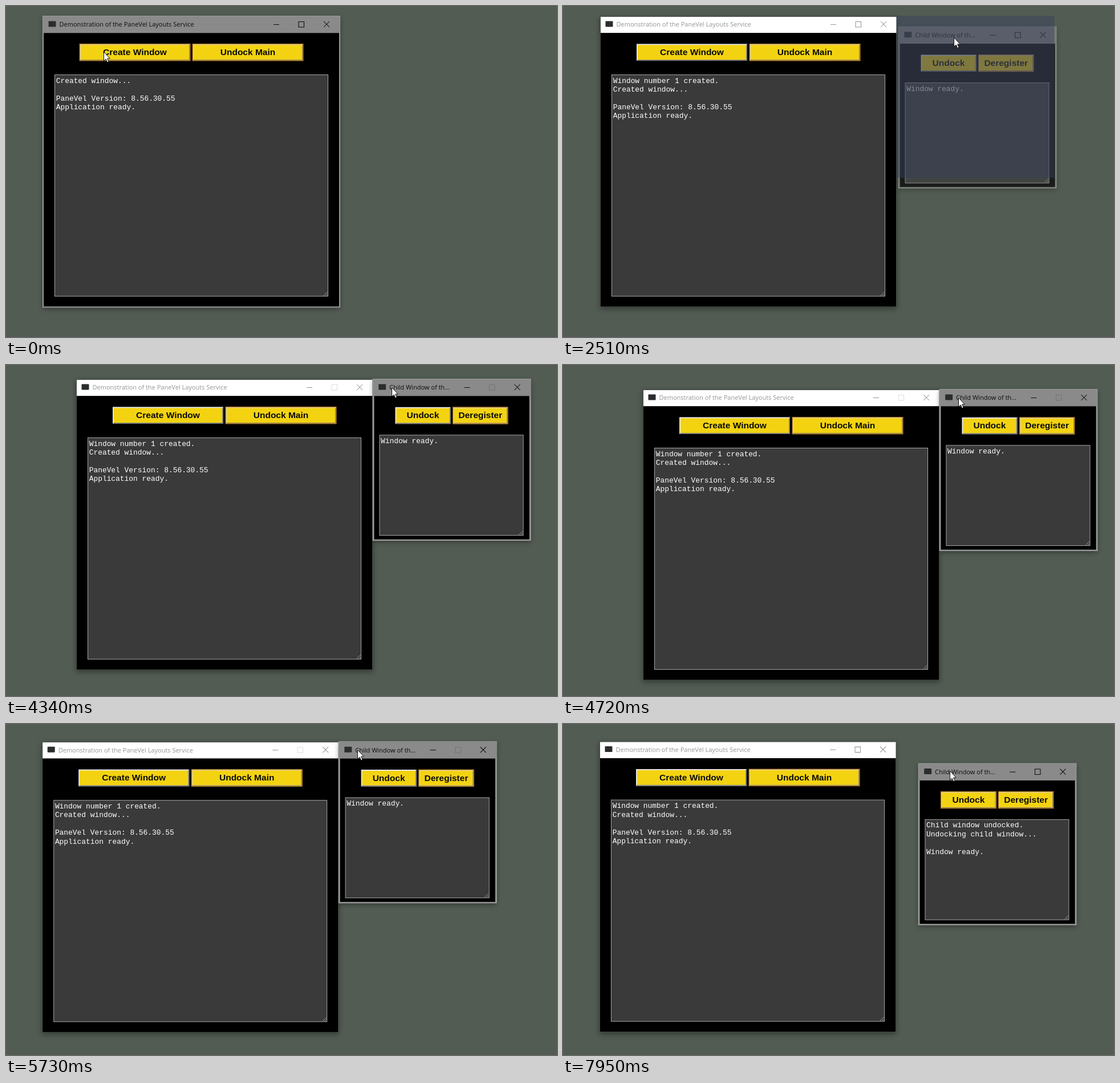
Animation of 966 by 580 pixels, one loop 8000 ms. Source, as an HTML page:

```html
<!DOCTYPE html>
<html lang="en">
<head>
<meta charset="utf-8">
<title>Window docking</title>
<style>
html, body { margin: 0; width: 100%; height: 100%; overflow: hidden; background: #525c53; }
svg { display: block; width: 966px; height: 580px; }
text { white-space: pre; }
.title { font: 11px "Open Sans", sans-serif; }
.label { font: bold 15.5px "Liberation Sans", Arial, sans-serif; text-anchor: middle; }
.log { font: 12.9px "Liberation Mono", "Courier New", monospace; fill: #fff; }
</style>
</head>
<body>
<svg id="stage" viewBox="0 0 966 580">
  <defs>
    <filter id="soft" x="-20%" y="-20%" width="140%" height="140%"><feGaussianBlur stdDeviation="5"/></filter>
  </defs>
  <rect width="966" height="580" fill="#525c53"/>
</svg>
<script>
const LOOP = 8000, LINE = 15.47;
const stage = document.getElementById('stage');

function add(parent, tag, attrs, text) {
  const node = document.createElementNS('http://www.w3.org/2000/svg', tag);
  for (const key in attrs) node.setAttribute(key, attrs[key]);
  if (text) node.textContent = text;
  parent.appendChild(node);
  return node;
}

function box(parent, l, t, r, b, fill, more) {
  return add(parent, 'rect', { x: l, y: t, width: r - l, height: b - t, fill, ...more });
}

const show = (node, on) => node.setAttribute('display', on ? 'inline' : 'none');
const move = (node, [x, y]) => node.setAttribute('transform', `translate(${x} ${y})`);

// Raised button with an optional focus ring
function button(parent, l, t, r, b, label) {
  box(parent, l, t, r, b, '#e6e6e6');
  add(parent, 'path', { d: `M${l} ${b}l2-2H${r - 2}V${t + 2}l2-2V${b}Z`, fill: '#7b7b78' });
  box(parent, l + 1.9, t + 1.9, r - 1.9, b - 1.9, '#f3d311');
  const ring = box(parent, l + .3, t + .3, r - .3, b - .3, 'none', { stroke: '#bd8424', 'stroke-width': 1.5 });
  add(parent, 'text', { x: (l + r) / 2, y: t + 19.6, class: 'label', fill: '#0a0a05' }, label);
  return ring;
}

function logArea(parent, l, t, r, b) {
  box(parent, l + .5, t + .5, r - .5, b - .5, '#3a3a3a', { stroke: '#a6a6a6' });
  add(parent, 'path', { d: `M${r - 8} ${b - 1.5}l6.5-6.5M${r - 4} ${b - 1.5}l2.5-2.5`, stroke: '#aaa', 'stroke-width': .9 });
  const rows = [0, 1, 2, 3, 4].map(i =>
    add(parent, 'text', { x: l + 2.7, y: t + 14.6 + i * LINE, class: 'log' }));
  return lines => rows.forEach((row, i) => { row.textContent = lines[i] || ''; });
}

// Outer edges l, t, r, b of the focused window; e is its side border
function makeWindow(l, t, r, b, e, title) {
  const g = add(stage, 'g', {});
  box(g, l + 1, t + 4, r - 1, b + 2, '#000', { opacity: .4, filter: 'url(#soft)' });
  const frame = box(g, l, t, r, b);
  const bar = box(g, l + 1, t + 1, r - 1, t + 30.3);
  box(g, l + e, t + 30.3, r - e, b - Math.min(e, 2.4), '#000');
  box(g, l + 10.5, t + 9.5, l + 23.5, t + 19.5, '#2a2d2e', { rx: 1 });
  const name = add(g, 'text', { x: l + 29.5, y: t + 19.4, class: 'title' }, title);
  const y = t + 15;
  const glyph = d => add(g, 'path', { d, fill: 'none', 'stroke-width': 1.05 });
  const min = glyph(`M${r - 117} ${y + .5}h10`);
  const max = glyph(`M${r - 73} ${y - 4.5}h9.5v9.5h-9.5Z`);
  const close = glyph(`M${r - 29} ${y - 5}l10 10m0-10l-10 10`);

  function style(active, docked) {
    const ink = active ? '#0c0c0c' : '#929692';
    frame.setAttribute('fill', active ? '#999b99' : '#46504680');
    bar.setAttribute('fill', active ? '#8a8a8a' : '#fff');
    bar.setAttribute('x', active ? l + 1 : l + 2);
    bar.setAttribute('y', active ? t + 1 : t + 2);
    bar.setAttribute('width', r - l - (active ? 2 : 3.5));
    bar.setAttribute('height', active ? 29.3 : 28.3);
    name.setAttribute('fill', ink);
    for (const p of [min, close]) p.setAttribute('stroke', ink);
    max.setAttribute('stroke', docked ? (active ? '#737573' : '#dbe0db') : ink);
  }
  return { g, style };
}

const main = makeWindow(64, 17, 586, 528.5, 2, 'Demonstration of the PaneVel Layouts Service');
const createRing = button(main.g, 129, 66.4, 323, 96, 'Create Window');
button(main.g, 327, 66.4, 521, 96, 'Undock Main');
const mainLog = logArea(main.g, 85, 120, 565, 509);

const child = makeWindow(175.2, 173, 453, 457, 2.8, 'Child Window of th...');
const undockRing = button(child.g, 215, 222.8, 312, 252.2, 'Undock');
button(child.g, 316, 222.8, 412.5, 252.2, 'Deregister');
const childLog = logArea(child.g, 187, 271.3, 440, 448);

const preview = box(stage, 584.5, 17, 861.5, 301, 'rgba(57,62,93,.47)');
const pointer = add(stage, 'path', {
  d: 'M.5.5V16.3L4.1 13 6.6 18.7 9.1 17.6 6.6 12H11.3Z',
  fill: '#fff', stroke: '#111', 'stroke-width': 1
});

const ready = ['Created window...', '', 'PaneVel Version: 8.56.30.55', 'Application ready.'];
const created = ['Window number 1 created.', ...ready];
const undocking = ['Undocking child window...', '', 'Window ready.'];

// Each step changes only what it names. p: pointer, m: main shift, k: child shift
const steps = [
  [0, { p: [171, 80], m: [0, 0], k: [0, 0], log: ready, note: ['Window ready.'],
        child: false, mainActive: true, docked: false, near: false, focus: false }],
  [200, { p: [174, 88] }],
  [420, { p: [190, 108] }],
  [640, { p: [222, 145] }],
  [860, { p: [248, 178], log: created }],
  [1080, { p: [260, 190], child: true }],
  [1280, { p: [264, 193], mainActive: false }],
  [1480, { p: [266, 194] }],
  [1680, { p: [267, 195] }],
  [1880, { p: [384, 167], k: [113, -29] }],
  [2080, { p: [555, 124], k: [284, -72] }],
  [2280, { p: [684, 100], k: [412.8, -95] }],
  [2510, { p: [685, 55], k: [412.5, -137.3], near: true }],
  [2710, { p: [684, 53], k: [411.5, -139] }],
  [2910, { p: [683, 52], near: false, docked: true }],
  [3110, { p: [660, 45] }],
  [3310, { p: [632, 36] }],
  [3520, { p: [618, 32] }],
  [4120, { p: [639, 33], m: [21, 1] }],
  [4340, { p: [676, 39], m: [58, 7] }],
  [4540, { p: [693, 57], m: [75, 25] }],
  [4740, { p: [676, 68], m: [58, 36.5] }],
  [4940, { p: [633, 53], m: [16, 21] }],
  [5140, { p: [602, 32], m: [-14.5, 2] }],
  [5320, { p: [583, 28], m: [-33.5, -2.8] }],
  [5530, { p: [596, 38], m: [-21, 6.5] }],
  [5730, { p: [616, 45], m: [-1.8, 13.2] }],
  [5940, { p: [617, 44], m: [-1, 12.6] }],
  [6330, { p: [652, 66] }],
  [6540, { p: [682, 86] }],
  [6750, { focus: true, note: undocking }],
  [6950, { docked: false, k: [447.4, -104.4] }],
  [7150, { note: ['Child window undocked.', ...undocking] }],
  [7350, { p: [679, 94] }],
  [7950, { p: [678, 82] }]
];

function draw(t) {
  const s = {};
  for (const [at, change] of steps) if (at <= t) Object.assign(s, change);
  move(main.g, s.m);
  move(child.g, s.docked ? [s.m[0] + 409.4, s.m[1] - 156] : s.k);
  move(pointer, s.p);
  main.style(s.mainActive, s.docked);
  child.style(true, s.docked);
  child.g.setAttribute('opacity', s.near ? .68 : 1);
  show(child.g, s.child);
  show(preview, s.near);
  show(createRing, s.mainActive);
  show(undockRing, s.focus);
  mainLog(s.log);
  childLog(s.note);
}

const start = performance.now();
function tick() {
  draw((performance.now() - start) % LOOP);
  requestAnimationFrame(tick);
}
tick();
</script>
</body>
</html>
```
